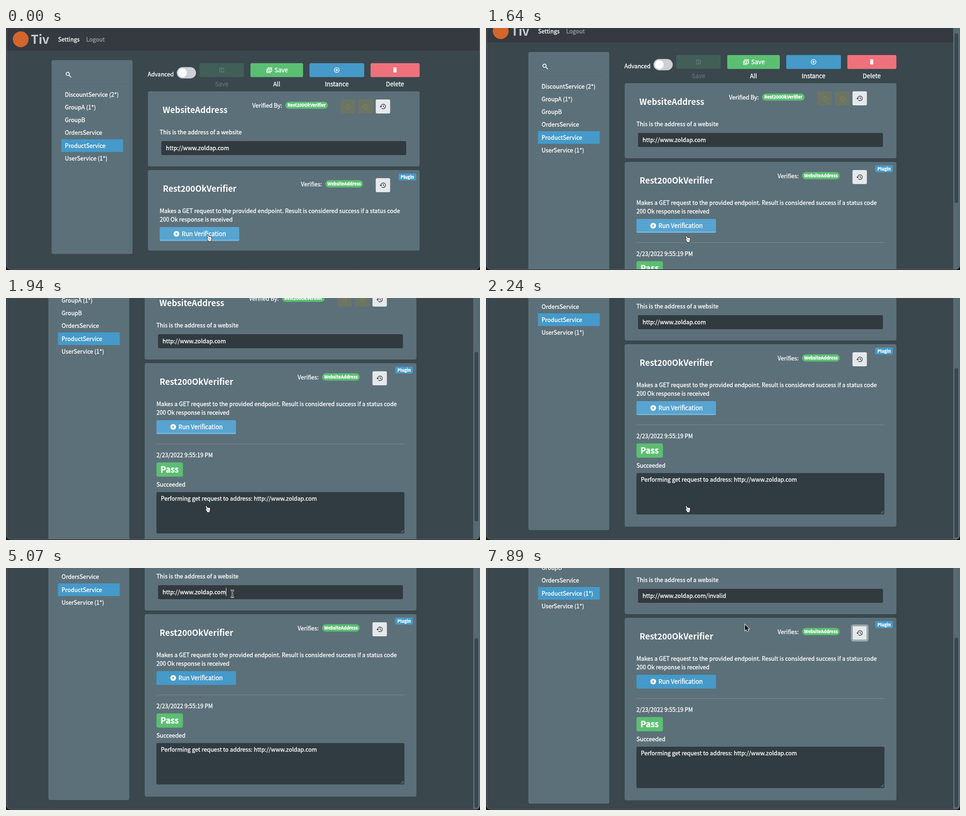
An HTML page with a canvas that plays this animation: 1047x535 px, repeating every 8 s.

```html
<!DOCTYPE html>
<html lang="en">
<head>
<meta charset="utf-8">
<title>Settings</title>
<style>
  html, body { margin: 0; width: 100%; height: 100%; overflow: hidden; background: #15171c; }
  canvas { display: block; }
</style>
</head>
<body>
<canvas id="stage" width="1047" height="535"></canvas>
<script>
const ctx = document.getElementById('stage').getContext('2d');
const LOOP = 8000;
const FAMILY = '"Noto Sans CJK JP", "Noto Sans CJK SC", "Noto Sans CJK", "Noto Sans", sans-serif';
const EM = 1.11; // the CJK family draws its Latin letters larger than nominal
const C = {
  page: '#3a474d', bar: '#343a40', card: '#5c7079', field: '#313a3f', area: '#303c41',
  green: '#5bbf72', blue: '#459ac9', hover: '#58a4d0', red: '#ef717b', pale: '#e6e9ec',
  ink: '#30363b', white: '#fff', rule: '#7d8d95', off: '#6c7563', offIcon: '#837f58'
};
const URL_TEXT = 'http://www.zoldap.com';

// Each row: start time, then the values held until the next row.
const scrollSteps = [[0, 0, 0], [1200, 0, 3], [1640, 18, 12], [1790, 118, 84], [1940, 170, 119],
  [2090, 203, 147], [2240, 212, 155], [7890, 204, 154]];
const cursorSteps = [[0, 448, 465, hand], [450, 447, 466, hand], [1050, 445, 467, hand],
  [3140, 445, 466, beam], [3290, 444, 464, beam], [3440, 444, 461, beam], [3580, 452, 385, beam],
  [3730, 478, 200, beam], [3880, 497, 82, beam], [4020, 500, 57, beam],
  [7590, 540, 96, arrow], [7740, 572, 125, arrow]];
const typedSteps = [[0, ''], [5520, '/'], [5970, '/i'], [6120, '/inv'], [6260, '/inva'],
  [6410, '/inval'], [6560, '/invalid']];
const caretSteps = [[0, false], [4020, true], [4620, false], [5070, true], [7000, false]];
const buttonSteps = [[0, C.hover], [150, '#4f9fcd'], [300, C.blue], [450, '#4a9ccb'],
  [600, '#4d9ecc'], [750, '#50a0cd'], [900, '#54a2cf'], [1050, C.hover], [3140, C.blue]];

const at = (rows, t) => rows.filter(row => row[0] <= t).pop().slice(1);

function box(x1, y1, x2, y2, color, r = 3) {
  ctx.fillStyle = color;
  ctx.beginPath();
  ctx.roundRect(x1, y1, x2 - x1, y2 - y1, r);
  ctx.fill();
}

function disc(x, y, r, color) {
  ctx.fillStyle = color;
  ctx.beginPath();
  ctx.arc(x, y, r, 0, Math.PI * 2);
  ctx.fill();
}

// y is the middle of the capital letters; the thin stroke thickens the letters a little.
function text(s, x, y, { size = 14, color = C.white, weight = 400, align = 'left', stroke = 0.35 } = {}) {
  ctx.font = `${weight} ${size / EM}px ${FAMILY}`;
  ctx.textAlign = align;
  ctx.fillStyle = ctx.strokeStyle = color;
  ctx.lineWidth = stroke;
  ctx.lineJoin = 'round';
  const base = y + size * 0.33;
  ctx.fillText(s, x, base);
  if (stroke) ctx.strokeText(s, x, base);
}

function heading(s, x, y, options) {
  text(s, x, y, { size: 20.3, weight: 700, stroke: 0, ...options });
}

function line(d, color, width = 1.3) {
  ctx.strokeStyle = color;
  ctx.lineWidth = width;
  ctx.stroke(new Path2D(d));
}

function fill(d, color) {
  ctx.fillStyle = color;
  ctx.fill(new Path2D(d));
}

function moved(x, y, draw) {
  ctx.save();
  ctx.translate(x, y);
  draw();
  ctx.restore();
}

function outlined(d, inside, edge) {
  line(d, edge, 2);
  fill(d, inside);
}

function hand() {
  ctx.scale(0.82, 0.82);
  outlined('M-4.5-8q1.5-1.3 2.6 0l1.4 4 1.4-.6 1.3.8 1.5-.5 1.2 1 1.4 0 .9 1.8-.4 4-1.3 3v2.5h-6.5v-2l-3.5-5.2q-.2-1.8 1.6-1.2l1.1 1z', '#fff', '#16191b');
  line('M-.3-1v4M2 0v3.5M4.2 .5v3', '#444', 0.7);
}

function beam() {
  const d = 'M-4-7.5h2.5l1.5 1.3 1.5-1.3h2.5M-4 7.5h2.5l1.5-1.3 1.5 1.3h2.5M0-6.2v12.4M-2 2.5h4';
  line(d, '#e8eaeb', 2.8);
  line(d, '#16191b', 1.1);
}

function arrow() {
  outlined('M0 0v13l3-2.8 2.1 4.7 2.1-1-2-4.5h4.1z', '#0c0d0e', '#f2f2f2');
}

function historyIcon(x, y, color) {
  moved(x, y, () => {
    line('M-4.4 0a5.2 5.2 0 1 1 1.6 3.8M1-3v3.3l2.3 1.4', color);
    fill('M-7.2-.4h5.4l-2.7 2.9z', color);
  });
}

function undoIcon(x, y, color) {
  moved(x, y, () => {
    line('M-3.6-1.5a4.3 4.3 0 1 0 3.6-2.4', color);
    fill('M.5-6.6v5.2l-3-2.6z', color);
  });
}

function saveIcon(x, y, color) {
  moved(x, y, () => {
    line('M-4.5-4.5h7l2 2v7h-9zM-2.5-2.6h4', color, 1.5);
    disc(0, 1.8, 1.6, color);
  });
}

function saveAllIcon(x, y) {
  moved(x, y, () => line('M-3-5h8.5v8h-8.5zM-5.5-3v8.5h9M-3-2.2h8.5M1.2-2.2v5', C.white, 1.4));
}

function plusIcon(x, y) {
  moved(x, y, () => line('M5.4 0a5.4 5.4 0 1 1-10.8 0a5.4 5.4 0 1 1 10.8 0M-3 0h6M0-3v6', C.white));
}

function binIcon(x, y) {
  moved(x, y, () => fill('M-4-5.2h2l.7-.8h2.6l.7.8h2v1.4h-8zM-3.4-3h6.8v7.2q0 1.3-1.3 1.3h-4.2q-1.3 0-1.3-1.3z', C.white));
}

function tag(s, x1, y1, x2, y2, color, r) {
  box(x1, y1, x2, y2, color, r);
  text(s, (x1 + x2) / 2, (y1 + y2) / 2, { size: 10.5, weight: 700, align: 'center', stroke: 0.4 });
}

function drawHeader(right) {
  ctx.fillStyle = C.bar;
  ctx.fillRect(0, 0, right, 50);
  disc(32.5, 25, 17.5, '#d3652d');
  heading('Tiv', 55, 25.5, { size: 30, color: '#c9cccf' });
  text('Settings', 115, 25.8);
  text('Logout', 177, 25.8, { color: '#9a9da0' });
}

function drawSidebar(bottom, changed) {
  box(100.7, 71, 279.5, bottom, C.card, 4);
  moved(138, 103, () => line('M2-1.6a3.6 3.6 0 1 1-7.2 0a3.6 3.6 0 1 1 7.2 0M1.2 1.2l4.8 4.8', C.white, 1.7));
  line('M114 124.5H264', '#53666e', 1);
  box(122, 246, 258.5, 274, C.blue, 0);
  ['DiscountService (2*)', 'GroupA (1*)', 'GroupB', 'OrdersService',
    'ProductService' + (changed ? ' (1*)' : ''), 'UserService (1*)']
    .forEach((name, i) => text(name, 130, 147.2 + i * 28.2));
}

function drawToolbar() {
  text('Advanced', 313, 102);
  box(377.3, 86.5, 419.7, 111.5, '#ccd0d6', 12.5);
  disc(390, 99, 9.7, C.white);
  const label = { size: 14.8, align: 'center' };
  box(427.2, 77.7, 525.5, 108.5, '#415f57');
  saveIcon(476.5, 93, '#66787a');
  text('Save', 476.5, 124, { ...label, color: '#637076' });
  box(540, 77.7, 656.2, 108.5, C.green);
  saveAllIcon(581.5, 93);
  text('Save', 593, 93, { size: 14.8 });
  text('All', 598, 124, label);
  box(670.3, 77.7, 791.2, 108.5, C.blue);
  plusIcon(730.7, 93);
  text('Instance', 730.7, 124, label);
  box(805.3, 77.7, 913.7, 108.5, C.red);
  binIcon(859.2, 93);
  text('Delete', 859.2, 124, label);
}

function drawAddress(typed, caret) {
  box(313.5, 140, 913.7, 306, C.card, 4);
  heading('WebsiteAddress', 346, 181.3);
  text('Verified By:', 544, 171.5);
  tag('Rest200OkVerifier', 617, 163, 711, 178.5, C.green, 8);
  box(739, 158, 771, 189, C.off);
  undoIcon(755, 173.5, C.offIcon);
  box(778, 158, 810, 189, C.off);
  historyIcon(794, 173.5, C.offIcon);
  box(816.7, 158, 848.5, 189, C.pale);
  historyIcon(832.5, 173.5, C.ink);
  text('This is the address of a website', 339.5, 230);
  box(343, 250, 884, 281, C.field);
  const value = URL_TEXT + typed;
  text(value, 353, 265.5);
  if (caret) {
    ctx.fillRect(Math.round(353 + ctx.measureText(value).width), 256, 1, 18);
  }
}

function drawVerifier(bottom, buttonColor, focused) {
  box(313.5, 314, 913.7, bottom, C.card, 4);
  tag('Plugin', 867, 321.5, 906, 337, C.blue, 3);
  heading('Rest200OkVerifier', 346.5, 355.3);
  text('Verifies:', 651.5, 345.5);
  tag('WebsiteAddress', 705.5, 336.5, 788.5, 352.5, C.green, 8);
  if (focused) box(813.5, 329, 852, 366.5, '#a3adb3', 5);
  box(816.7, 332, 848.5, 363, C.pale);
  if (focused) {
    ctx.strokeStyle = '#7b858c';
    ctx.lineWidth = 1;
    ctx.strokeRect(816.5, 332, 32, 31);
  }
  historyIcon(832.5, 347.5, C.ink);
  text('Makes a GET request to the provided endpoint. Result is considered success if a status code', 339.5, 404);
  text('200 Ok response is received', 339.5, 423.5);
  box(339.5, 440, 515.2, 470.5, buttonColor);
  if (buttonColor === C.hover) box(339.5, 468, 515.2, 470.5, '#76b9e0', [0, 0, 3, 3]);
  disc(376.5, 455, 6.3, C.white);
  moved(376.5, 455, () => fill('M1-4.5l-3.6 5.3h2.2l-.6 3.7 3.6-5.3h-2.3z', buttonColor));
  text('Run Verification', 388, 455, { size: 14.8 });
}

function drawResult() {
  line('M339.5 492.5H887', C.rule, 1);
  text('2/23/2022 9:55:19 PM', 339.5, 517.5);
  box(339.5, 533.5, 398, 565, C.green, 4);
  heading('Pass', 368.7, 549.5, { align: 'center', stroke: 0.4 });
  text('Succeeded', 339.5, 582.5);
  box(339.5, 599, 887.3, 690.5, C.area);
  text('Performing get request to address: ' + URL_TEXT, 349.2, 613.5);
  line('M879.5 688.5l6-6M883 688.5l2.5-2.5', '#a5adb1', 0.9);
}

function drawScrollbar(top) {
  ctx.fillStyle = '#566a73';
  ctx.fillRect(1032, 0, 15, 535);
  box(1035, top, 1043, top + 375, C.page, 4);
}

function render(t) {
  const [scroll, thumb] = at(scrollSteps, t);
  const [x, y, cursor] = at(cursorSteps, t);
  const done = t >= 1200, changed = t >= 7000;

  ctx.fillStyle = '#15171c';
  ctx.fillRect(0, 0, 1047, 535);
  ctx.save();
  ctx.beginPath();
  ctx.roundRect(1, -20, 1045.5, 554, 9);
  ctx.clip();
  ctx.fillStyle = C.page;
  ctx.fillRect(0, 0, 1047, 535);
  moved(0, -scroll, () => {
    drawHeader(done ? 1032 : 1047);
    ctx.translate(done ? -7.2 : 0, 0);
    drawSidebar(done ? 725 : 499.5, changed);
    drawToolbar();
    drawAddress(at(typedSteps, t)[0], at(caretSteps, t)[0]);
    drawVerifier(done ? 717.5 : 492, at(buttonSteps, t)[0], changed);
    if (done) drawResult();
  });
  if (done) drawScrollbar(thumb);
  ctx.restore();

  ctx.strokeStyle = '#6a7277';
  ctx.lineWidth = 1;
  ctx.beginPath();
  ctx.roundRect(1.5, -20, 1044.5, 553.5, 9);
  ctx.stroke();
  moved(x, y, cursor);
}

const start = performance.now();
function tick(now) {
  render(Math.max(0, now - start) % LOOP);
  requestAnimationFrame(tick);
}
tick(start);
</script>
</body>
</html>
```
